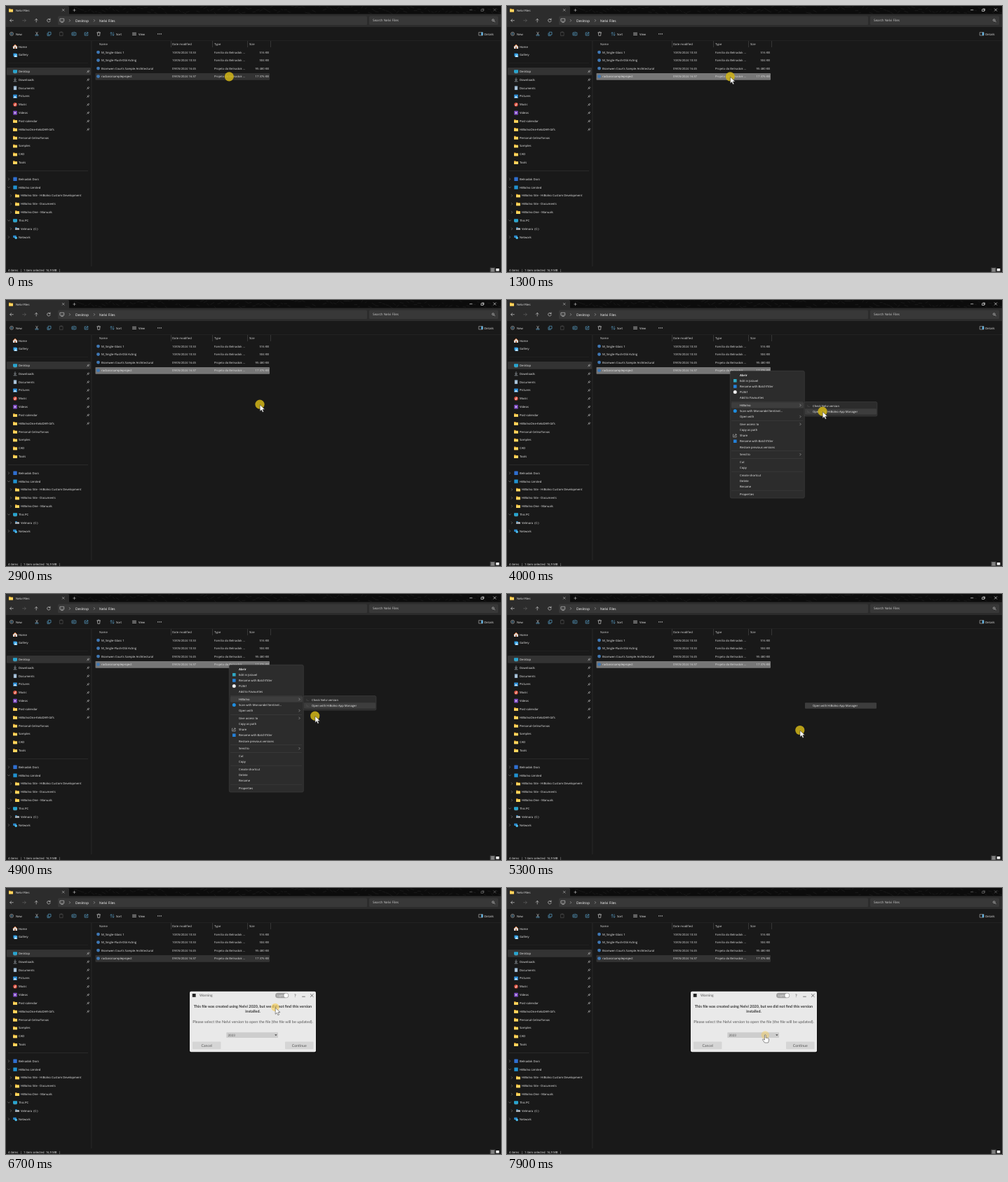
Animation of 706 by 380 pixels, one loop 8000 ms. Source, as an HTML page:

```html
<!DOCTYPE html>
<html lang="en">
<head>
<meta charset="utf-8">
<title>File manager</title>
<style>
html, body { margin: 0; width: 100%; height: 100%; overflow: hidden; background: #191919; }
svg { display: block; width: 706px; height: 380px; font: 4.2px "Open Sans", "Noto Sans", sans-serif; text-rendering: geometricPrecision; }
text { white-space: pre; }
.dialog { font-family: Lato, sans-serif; }
</style>
</head>
<body>
<svg id="stage" viewBox="0 0 706 380" xmlns="http://www.w3.org/2000/svg"></svg>
<script>
const LOOP = 8000, STEP = 100;

// --- drawing helpers: each returns SVG markup
const rect = (x, y, w, h, fill, r = 0, more = '') =>
  `<rect x="${x}" y="${y}" width="${w}" height="${h}" rx="${r}" fill="${fill}" ${more}/>`;
const circle = (x, y, r, fill, more = '') => `<circle cx="${x}" cy="${y}" r="${r}" fill="${fill}" ${more}/>`;
const line = (d, color = '#ddd', width = 0.6) =>
  `<path d="${d}" fill="none" stroke="${color}" stroke-width="${width}" stroke-linecap="round" stroke-linejoin="round"/>`;
const shape = (d, fill) => `<path d="${d}" fill="${fill}"/>`;
// y is the vertical middle of the line of text
const text = (x, y, s, fill = '#eee', size = 4.2, more = '') =>
  `<text x="${x}" y="${y + size * 0.36}" font-size="${size}" fill="${fill}" ${more}>${s}</text>`;
const group = (id, body, more = '') => `<g id="${id}" ${more}>${body}</g>`;
const at = (x, y, body) => `<g transform="translate(${x} ${y})">${body}</g>`;
const cross = (x, y, r, color, width) =>
  line(`M${x - r} ${y - r}l${2 * r} ${2 * r}M${x + r} ${y - r}l${-2 * r} ${2 * r}`, color, width);
const chevron = (x, y, open, color = '#999') =>
  line(open ? `M${x - 1.5} ${y - .7}l1.5 1.5l1.5 -1.5` : `M${x - .7} ${y - 1.4}l1.4 1.4l-1.4 1.4`, color, 0.5);

// --- icons, all centred on 0,0
const icons = {
  folder: shape('M-3 -2.3h2.2l.8 .8h3v3.9h-6z', '#e0a52b') + rect(-3, -1, 6, 3.4, '#ffd660', .4),
  home: shape('M-3 0L0 -2.9L3 0V3H-3z', '#d9dce0') + line('M-3 0L0 -2.8L3 0', '#e87a35', .9) + rect(-.8, .6, 1.6, 2.4, '#b55b2a'),
  gallery: rect(-2.8, -2.4, 4.8, 4.4, '#1673b5', .5) + rect(-1.7, -1.5, 4.8, 4.4, '#4fb4ee', .5) + shape('M-1.5 2.8L.5 .4L3 2.8z', '#dff2ff'),
  desktop: rect(-3, -2.3, 6, 4.4, '#27a4cf', .5) + rect(-2, 2.1, 4, .6, '#7dd3ec'),
  download: line('M0 -2.5V1M-1.5 -.4L0 1.1L1.5 -.4M-2 2.5H2', '#aab3ba', .7),
  document: rect(-2.2, -2.8, 4.4, 5.6, '#8aa9c4', .4) + line('M-1.2 -1h2.4M-1.2 .3h2.4M-1.2 1.6h2.4', '#eef4fa', .5),
  pictures: rect(-2.9, -2.5, 5.8, 5, '#2e8ed6', .5) + shape('M-2.6 2.2L-.2 -.5L2.6 2.2z', '#d7efff'),
  music: circle(0, 0, 2.8, '#d9503f') + circle(-.4, .8, .8, '#fff') + line('M.3 .8V-1.4L1.3 -1', '#fff', .5),
  video: rect(-2.8, -2.8, 5.6, 5.6, '#7f4bc4', .6) + shape('M-.8 -1.3L1.3 0L-.8 1.3z', '#fff'),
  blueSquare: rect(-2.7, -2.7, 5.4, 5.4, '#2f6fd0', .4),
  cyanSquare: rect(-2.7, -2.7, 5.4, 5.4, '#2192d0', .4),
  drive: rect(-3, -1, 6, 2.6, '#b9bfc5', .4) + rect(-2.8, -2.2, 2.4, 1.2, '#2b9be0'),
  network: rect(-2.9, -2.4, 4.6, 3.4, '#2b86c9', .4) + circle(1.2, 1.2, 1.7, '#4cc0ee'),
  file: circle(0, 0, 2.4, '#3f78b5'),
  pin: line('M-1.6 1.6L-.4 .4M-.9 -.5L.9 1.2M-.3 -.6L.8 -1.7L1.8 -.7L.7 .5z', '#bbb', .6)
};

const sidebarY = n => 58 + 11.83 * n;
// [slot, label, icon, nested, tree state: 0 none, 1 closed, 2 open]
const sidebar = [
  [0, 'Home', 'home'], [1, 'Gallery', 'gallery'],
  [3, 'Desktop', 'desktop'], [4, 'Downloads', 'download'], [5, 'Documents', 'document'],
  [6, 'Pictures', 'pictures'], [7, 'Music', 'music'], [8, 'Videos', 'video'],
  [9, 'Post-calendar', 'folder'], [10, 'HiBolnoOne-KeloDAR-Gifs', 'folder'],
  [11, 'Personal-CelinaTorvas', 'folder'], [12, 'Samples', 'folder'], [13, 'CAD', 'folder'], [14, 'Tools', 'folder'],
  [16, 'Belnadok Docs', 'blueSquare', 0, 1], [17, 'HiBolno Limited', 'cyanSquare', 0, 2],
  [18, 'HiBolno Site - HiBolno Custom Development', 'folder', 1, 1],
  [19, 'HiBolno Site - Documents', 'folder', 1, 1], [20, 'HiBolno.One - Manuals', 'folder', 1, 1],
  [21, 'This PC', 'desktop', 0, 2], [22, 'Velmora  (C:)', 'drive', 1, 1], [23, 'Network', 'network', 0, 1]
];
const files = [
  ['M_Single-Glass 1', '10/05/2024 10:33', 'Família do Belnadok ...', '516 KB'],
  ['M_Single-Flush-Dbl Acting', '10/05/2024 10:33', 'Família do Belnadok ...', '504 KB'],
  ['Bramwen Courts Sample Architectural', '09/05/2024 16:45', 'Projeto do Belnadok ...', '95 480 KB'],
  ['racbasicsampleproject', '09/05/2024 16:37', 'Projeto do Belnadok ...', '17 376 KB']
];

function titleBar() {
  let seed = 7;
  const random = () => (seed = seed * 16807 % 2147483647) / 2147483647;
  let texture = '';
  for (let x = 92; x < 706; x += 5)
    texture += `M${x} ${(random() * 10).toFixed(1)}l${(2 + random() * 3).toFixed(1)} ${(random() * 6 - 3).toFixed(1)}`;
  return rect(0, 0, 706, 12, '#0c0c0c') + line(texture, '#191919', 1)
    + rect(0, 0, 90, 13, '#2c2c2c', 1.5) + at(7, 6, icons.folder) + text(14, 6, 'Nelvi Files')
    + cross(81.7, 5.8, 1.4, '#ddd', .5) + line('M95.8 6h3.4M97.5 4.3v3.4', '#ddd', .5)
    + group('controls', line('M661.5 5.7h3.4M678 4.9h2.6v2.6h-2.6zM679 4h2.6v2.6', 'currentColor', .6) + cross(697, 5.5, 1.7, 'currentColor', .6));
}

function navigation() {
  return rect(0, 11.5, 706, 18.5, '#2c2c2c')
    + rect(74, 14.5, 441, 12.5, '#383838', 1.5) + rect(518, 14.5, 184, 12.5, '#383838', 1.5)
    + line('M10.3 20.7H5.7M7.6 18.8L5.7 20.7L7.6 22.6M43.2 23V18.4M41.3 20.3L43.2 18.4L45.1 20.3')
    + line('M23.7 20.7h4.6M26.4 18.8l1.9 1.9l-1.9 1.9', '#666')
    + line('M62.9 19.4A2.3 2.3 0 1 0 63.2 21.2M63 17.9v1.7h-1.7')
    + line('M77.3 18.2h5.4v3.7h-5.4zM78.7 23.4h2.6')
    + chevron(91, 20.8, false, '#ccc') + chevron(126, 20.8, false, '#ccc')
    + text(99, 20.8, 'Desktop', '#fff', 4.9) + text(133, 20.8, 'Nelvi Files', '#fff', 4.9)
    + text(523, 20.8, 'Search Nelvi Files', '#ccc', 4.6)
    + circle(694.7, 20.2, 1.4, 'none', 'stroke="#ddd" stroke-width=".6"') + line('M695.8 21.3l1.5 1.5');
}

function toolbar() {
  const blue = '#62b5e5';
  return circle(8, 39.8, 2.5, 'none', 'stroke="#ddd" stroke-width=".5"') + line('M6.8 39.8h2.4M8 38.6v2.4', blue, .5)
    + text(14, 40, 'New')
    + line('M42.6 37.2L45 41M45.3 37.2L42.9 41', '#ddd', .5)
    + circle(42.6, 41.7, .9, 'none', `stroke="${blue}" stroke-width=".5"`) + circle(45.3, 41.7, .9, 'none', `stroke="${blue}" stroke-width=".5"`)
    + line('M60.6 37.3h3.4v3.7h-3.4zM59 39v3.4h3.3', blue, .6)
    + line('M76.8 37.6h4.3v4.8h-4.3zM78 37h1.8', '#555', .6)
    + line('M96 38h-2v3.8h2M98.2 38h1.6v3.8h-1.6M97.1 37v5.6M95 40h1', blue, .6)
    + line('M114 38h-1.8v4h4.6v-1.3M114 40.7c.2-1.8 1.2-2.3 3-2.3M115.8 37.2l1.3 1.2l-1.3 1.2', blue, .6)
    + line('M129.8 38h4.8M130.4 38.2l.4 4.2h2.8l.4-4.2M131.4 37.2h1.6', '#ddd', .6)
    + line('M150 37.7v4.4M148.8 39L150 37.7L151.2 39M153 37.7v4.4M151.8 40.9L153 42.2L154.2 40.9', blue, .5)
    + text(157, 40, 'Sort')
    + line('M180.5 38.3h5M180.5 39.9h5M180.5 41.5h5') + text(189, 40, 'View')
    + [216.7, 219, 221.3].map(x => circle(x, 39.9, .7, '#ddd')).join('')
    + line('M674.6 37.7h5.4v4.3h-5.4z', '#ddd', .5) + rect(677.8, 37.7, 2.2, 4.3, blue) + text(682.3, 40, 'Details')
    + rect(0, 49.3, 706, .5, '#2b2b2b');
}

function sidePane() {
  const rows = sidebar.map(([n, label, icon, nested = 0, tree = 0]) => {
    const y = sidebarY(n), shift = nested * 3;
    return at(13 + shift, y, icons[icon]) + text(18 + shift, y, label)
      + (tree ? chevron(4 + shift, y, tree === 2) : '')
      + (n >= 3 && n <= 10 ? at(117, y, icons.pin) : '');
  });
  return rect(1, 88, 120, 10.8, '#333', 1) + rows.join('')
    + rect(3, 81.5, 114, .4, '#2b2b2b') + rect(3, 235.3, 114, .5, '#3a3a3a') + rect(121.6, 50, .6, 322, '#333');
}

function fileList() {
  const columns = [[133, 'Name', 235], [237, 'Date modified', 294.5], [297, 'Type', 344.5], [347, 'Size', 377.5]];
  const head = columns.map(([x, label, edge]) => text(x, 54.7, label, '#ddd') + rect(edge, 50, .5, 9, '#555'));
  const rows = files.map(([name, date, type, size], i) => {
    const y = 66.4 + 11.5 * i;
    return at(131.5, y - .3, icons.file) + text(136, y, name) + text(237, y, date, '#ddd') + text(297, y, type, '#ddd')
      + text(375, y, size, '#ddd', 4.2, 'text-anchor="end"');
  });
  return head.join('') + rect(127.5, 96, 248.5, 9.8, '#333', .8, 'id="row"') + rows.join('');
}

function statusBar() {
  return text(3, 377.2, '4 items') + text(20, 377.2, '|') + text(25, 377.2, '1 item selected  16,9 MB') + text(75, 377.2, '|')
    + rect(690.5, 373.7, 7, 6.3, '#555') + line('M692.2 375.5h3.6M692.2 377h3.6M692.2 378.5h3.6', '#ddd', .5)
    + rect(698.8, 375, 4.6, 3.8, '#eee', .3);
}

const hoverItem = rect(425, 155.2, 102, 8.6, '#3d3d3d', 1) + text(436, 159.4, 'Open with HiBolno App Manager');

function contextMenu() {
  const items = [
    [107.3, 'Abrir'], [115.3, 'Edit in Jotavel', '#2fa9c4'], [123.5, 'Rename with BatchTitler', '#2480d8'],
    [131.6, 'PLX61', '#eee'], [139.7, 'Add to Favourites'], [150.4, 'HiBolno'],
    [158.4, 'Scan with Morvandel Sentinel...', '#1f8ee0'], [166.6, 'Open with'], [177.4, 'Give access to'],
    [185.5, 'Copy as path'], [193.7, 'Share'], [201.8, 'Rename with BatchTitler', '#2480d8'],
    [210, 'Restore previous versions'], [220.6, 'Send to'], [231.4, 'Cut'], [239.5, 'Copy'],
    [250.2, 'Create shortcut'], [258.3, 'Delete'], [266.5, 'Rename'], [277.2, 'Properties']
  ];
  const labels = items.map(([y, label, color], i) => text(332, y, label, '#f2f2f2', 4.2, i ? '' : 'font-weight="700"')
    + (!color ? '' : /Ret|PLX|Scan/.test(label) ? circle(325.3, y, 2.5, color) : rect(323, y - 2.3, 4.6, 4.6, color, .3)));
  const arrows = [150.4, 166.6, 177.4, 220.6].map(y => chevron(418.5, y, false, '#ccc'));
  const rules = [145, 172, 215.3, 226, 244.9, 271.9].map(y => rect(320, y, 102, .4, '#484848'));
  return rect(318.3, 101.3, 106, 181.7, '#2c2c2c', 2, 'stroke="#474747" stroke-width=".5"')
    + group('parentHover', rect(320, 146.2, 103, 8.2, '#3d3d3d', 1))
    + labels.join('') + arrows.join('') + rules.join('')
    + line('M323 191.9h-.4v4h4.6v-1.2M324.4 194.4c.2-1.6 1-2 2.7-2M326 191.2l1.3 1.2l-1.3 1.2', '#ddd', .5);
}

function subMenu() {
  return rect(424, 145.5, 104, 20.5, '#2c2c2c', 2, 'stroke="#474747" stroke-width=".5"')
    + group('childHover', rect(425, 155.2, 102, 8.6, '#3d3d3d', 1))
    + text(436, 151.3, 'Check Nelvi version') + text(436, 159.4, 'Open with HiBolno App Manager')
    + [151.3, 159.4].map(y => line(`M428.5 ${y - 1}l1 1l-1 1M430 ${y + 1.2}h1.2`, '#666', .4)).join('');
}

function dialog() {
  const middle = 'text-anchor="middle"';
  const button = (x, label) => rect(x, 219.5, 40.5, 10.7, '#d5d5d5', 1) + text(x + 20.2, 224.9, label, '#555', 5.2, middle);
  return rect(261, 147.5, 182, 88, '#000', 2.5, 'opacity=".35"') + rect(262, 147.7, 180, 86.5, '#e9e9e9', 2)
    + rect(265.8, 151, 4.8, 4.8, '#222') + text(276, 153.5, 'Warning', '#555', 5)
    + rect(384, 149.7, 19.2, 7.6, '#a3a3a3', 3.8) + text(387, 153.5, 'Light', '#e5e5e5', 4) + circle(399.4, 153.5, 2.9, '#fff')
    + text(412.4, 153.6, '?', '#444', 6, middle) + line('M422.6 155.2h3.8', '#444', .7) + cross(436.3, 153.6, 1.9, '#444', .7)
    + text(352, 169.5, 'This file was created using Nelvi 2020, but we did not find this version', '#333', 5.45, middle + ' font-weight="700"')
    + text(352, 175.8, 'installed.', '#333', 5.45, middle + ' font-weight="700"')
    + text(352, 191.2, 'Please select the Nelvi version to open the file (the file will be updated).', '#555', 5.5, middle)
    + rect(314.3, 206.3, 73.7, 7.6, '#cdcdcd', .6) + text(316.5, 210.1, '2023', '#555', 4.5)
    + shape('M383.2 209.2h3.4l-1.7 2z', '#444') + button(266, 'Cancel') + button(398, 'Continue');
}

function pointer() {
  const edge = 'fill="#fff" stroke="#222" stroke-width=".5" stroke-linejoin="round"';
  return circle(0, -.5, 6.6, '#cdb218', 'id="halo"')
    + `<path id="arrow" d="M.2 0V9.2L2.4 7.2L3.9 10.6L5.5 9.9L4 6.6H7z" ${edge}/>`
    + `<path id="hand" d="M-.9 -.4q.9 -1 1.7 0V3.6q1-.7 1.6.2q1-.5 1.5.3q1-.3 1.3.7V7.6L4.2 10.4H-.8L-3.6 6.5q-.3-1.2.8-1.2L-.9 6.5z" ${edge}/>`;
}

const stage = document.getElementById('stage');
stage.innerHTML = rect(0, 0, 706, 380, '#191919') + titleBar() + navigation() + toolbar() + sidePane() + fileList() + statusBar()
  + group('menu', contextMenu()) + group('submenu', subMenu()) + group('flash', hoverItem)
  + group('dialog', dialog(), 'class="dialog"') + group('pointer', pointer());

const part = {};
stage.querySelectorAll('[id]').forEach(el => part[el.id] = el);
const show = (name, visible) => part[name].setAttribute('visibility', visible ? 'inherit' : 'hidden');

// Pointer path: [time, x, y]
const path = [
  [0, 318.3, 101.3], [1300, 318.3, 101.3], [1800, 352, 254], [2100, 351, 238], [2600, 351, 238],
  [2900, 362, 149.7], [3100, 318.5, 101.3], [3200, 318.5, 101.3], [3400, 330, 125], [3600, 342, 186],
  [3700, 362, 156], [3900, 436, 153], [4000, 450, 159.7], [4400, 450, 159.7], [4700, 456, 161],
  [5200, 417.8, 195], [5800, 417.8, 195], [6600, 384, 171], [6700, 384, 171], [7200, 345, 205],
  [7400, 374, 208], [7500, 374, 208], [7900, 368.3, 210.6], [8000, 368.3, 210.6]
];

function positionAt(t) {
  const i = path.findIndex(p => p[0] > t), [t0, x0, y0] = path[i - 1], [t1, x1, y1] = path[i];
  const k = (t - t0) / (t1 - t0);
  return [x0 + (x1 - x0) * k, y0 + (y1 - y0) * k];
}
const progress = (t, from, to) => Math.min(1, Math.max(0, (t - from) / (to - from)));
const during = (t, from, to) => t >= from && t < to;

function render(t) {
  const [x, y] = positionAt(t);
  const active = during(t, 1300, 5800), warned = t >= 5800;
  const overSelect = warned && y > 206 && x > 314 && x < 388;
  const shade = active ? 119 : warned ? 51 : Math.round(51 + 26 * progress(t, 200, 800));

  part.row.setAttribute('fill', `rgb(${shade},${shade},${shade})`);
  part.controls.setAttribute('color', active ? '#fff' : '#777');
  show('menu', during(t, 3200, 5300));
  show('submenu', during(t, 3800, 5300));
  show('parentHover', during(t, 3700, 5300));
  show('childHover', during(t, 4000, 5300));
  show('flash', during(t, 5300, 5600));
  part.flash.setAttribute('opacity', 1 - progress(t, 5300, 5600));
  show('dialog', warned);

  part.pointer.setAttribute('transform', `translate(${x.toFixed(2)} ${y.toFixed(2)})`);
  part.halo.setAttribute('fill', warned ? '#f7cf58' : '#cdb218');
  part.halo.setAttribute('opacity', overSelect ? .45 : warned ? .65 : .88);
  part.halo.setAttribute('r', warned ? 5.8 : 6.6);
  show('arrow', t >= 300 && !overSelect);
  show('hand', overSelect);
}

const start = performance.now();
function tick() {
  const elapsed = (performance.now() - start) % LOOP;
  render(Math.floor(elapsed / STEP) * STEP);
  requestAnimationFrame(tick);
}
tick();
</script>
</body>
</html>
```
